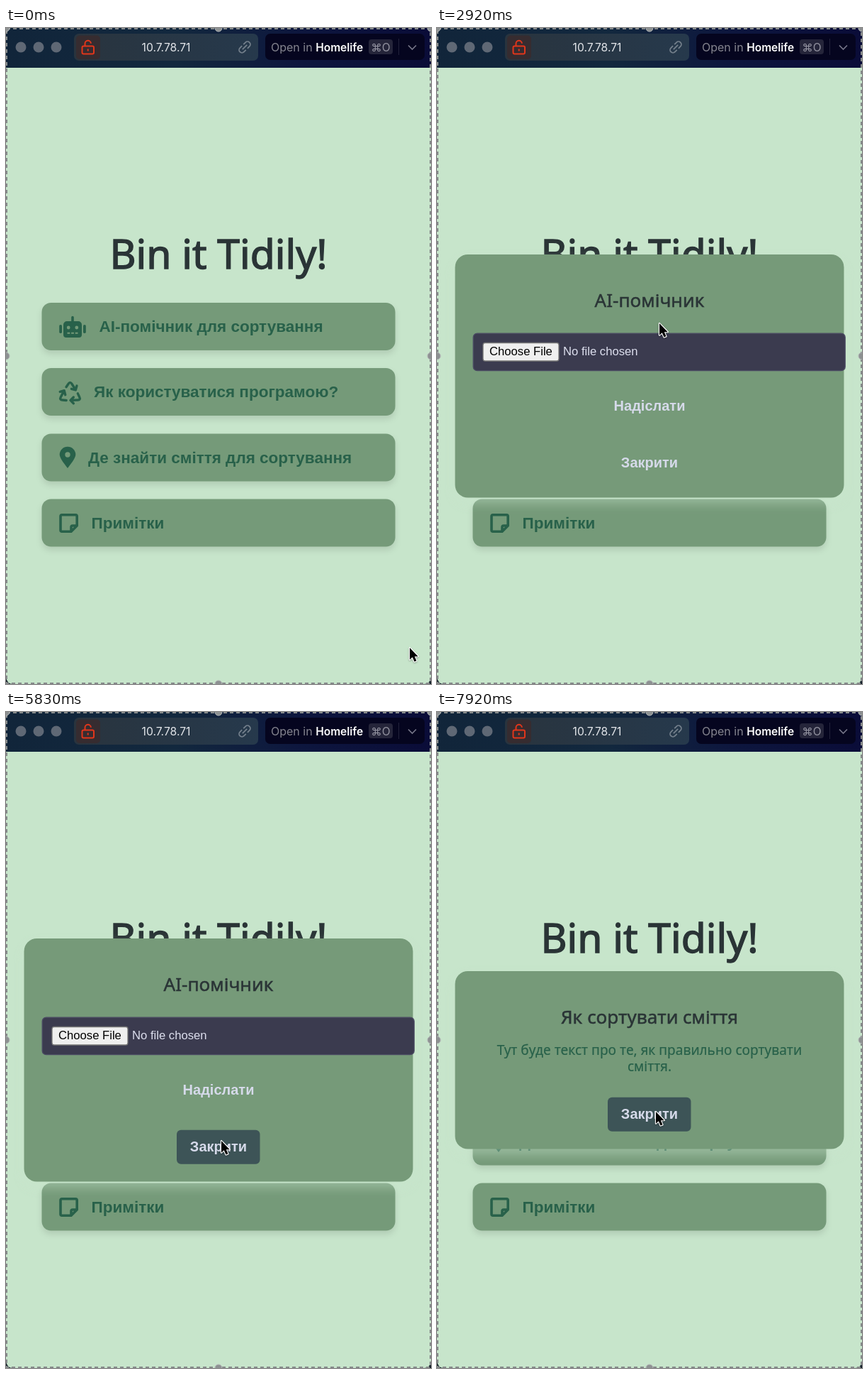
These frames come from a looping animation (600 by 924 pixels, 8 s). An HTML page:

```html
<!DOCTYPE html>
<html lang="uk">
<head>
<meta charset="utf-8">
<title>Bin it Tidily!</title>
<style>
  html, body { margin: 0; width: 100%; height: 100%; overflow: hidden; background: #c7e5cb; }
  svg { display: block; width: 600px; height: 924px; }
  text { white-space: pre; }

  .bar { font: 16px Inter, sans-serif; fill: #e3e6ea; }
  .head { font: 26px "Noto Sans", sans-serif; fill: #2a3436; stroke: #2a3436; stroke-width: .5; text-anchor: middle; }
  .title { font-size: 57px; stroke-width: 1.4; }
  .body { font: 19px "Noto Sans", sans-serif; fill: #28614a; stroke: #28614a; stroke-width: .2; text-anchor: middle; }
  .file { font: 16.67px "Liberation Sans", Arial, sans-serif; }
  .action { font: bold 20px "Liberation Sans", Arial, sans-serif; fill: #d6daea; text-anchor: middle; }

  .item { color: #759a79; }
  .plate { fill: currentColor; filter: drop-shadow(0 5px 4px rgba(0, 0, 0, .11)); }
  .item text { font: bold 22.5px "Liberation Sans", Arial, sans-serif; }
  .ink { fill: #28614a; }
  .line { fill: none; stroke: #28614a; stroke-linecap: round; stroke-linejoin: round; }
  .panel { fill: #769a79; filter: drop-shadow(0 8px 8px rgba(199, 229, 203, .45)); }
  .hover { fill: #3d5457; }

  .item, .modal, .hover, #cursor { animation: 8s linear infinite paused; }
  #ask { transform-origin: 300px 420.5px; animation-name: ask; }
  #how { transform-origin: 300px 512.5px; animation-name: how; }
  #where { transform-origin: 300px 605px; animation-name: where; }
  #helper { animation-name: helper; animation-timing-function: step-end; }
  #guide { animation-name: guide; animation-timing-function: step-end; }
  #send { animation-name: send; }
  #close1 { animation-name: close1; }
  #close2 { animation-name: close2; }
  #cursor { animation-name: cursor; filter: drop-shadow(0 1px 1px rgba(0, 0, 0, .3)); }

  @keyframes ask {
    0%, 22%, 42%, 100% { transform: scale(1); color: #759a79; }
    25.7%, 38% { transform: scale(1.05); color: #d6dfd7; }
  }
  @keyframes how {
    0%, 79%, 93%, 100% { transform: scale(1); color: #759a79; }
    82.6%, 89% { transform: scale(1.05); color: #d6dfd7; }
  }
  @keyframes where {
    0%, 75.5%, 82.5%, 100% { transform: scale(1); color: #759a79; }
    79% { transform: scale(1.05); color: #d6dfd7; }
  }
  @keyframes helper { 0%, 75.5% { opacity: 0; } 33% { opacity: 1; } 100% { opacity: 0; } }
  @keyframes guide { 0% { opacity: 0; } 87%, 100% { opacity: 1; } }
  @keyframes send { 0%, 57.5%, 70.5%, 100% { opacity: 0; } 60.5%, 68% { opacity: 1; } }
  @keyframes close1 { 0%, 69.5%, 100% { opacity: 0; } 72.5%, 76% { opacity: 1; } }
  @keyframes close2 { 0%, 91%, 100% { opacity: 0; } 94%, 99.9% { opacity: 1; } }
  @keyframes cursor {
    0%, 10% { transform: translate(570px, 873px); animation-timing-function: ease-in-out; }
    21.875% { transform: translate(544px, 391px); animation-timing-function: ease-in-out; }
    29% { transform: translate(322px, 423px); animation-timing-function: ease-out; }
    36.4%, 45% { transform: translate(314px, 416px); animation-timing-function: ease-in-out; }
    57.25% { transform: translate(276px, 508px); animation-timing-function: ease-out; }
    61%, 66% { transform: translate(290px, 531px); animation-timing-function: ease-in-out; }
    72%, 76% { transform: translate(304px, 604px); animation-timing-function: ease-out; }
    83.3%, 88% { transform: translate(332.5px, 528px); animation-timing-function: ease-in-out; }
    94%, 100% { transform: translate(309px, 563px); }
  }
</style>
</head>
<body>
<svg viewBox="0 0 600 924">
  <defs>
    <linearGradient id="sky">
      <stop offset="0" stop-color="#11253a"/>
      <stop offset=".4" stop-color="#12283e"/>
      <stop offset=".7" stop-color="#0d163e"/>
      <stop offset="1" stop-color="#0a0c38"/>
    </linearGradient>
    <linearGradient id="field">
      <stop offset="0" stop-color="#29343e"/>
      <stop offset="1" stop-color="#26394c"/>
    </linearGradient>
    <path id="arrow" d="M-5.2 -8.8L-2.3 -13Q0 -16.5 2.3 -13L7.2 -5.2M8.9 -10.4L7.4 -4.8L1.8 -6.3"/>
  </defs>

  <rect width="600" height="924" fill="#c7e5cb"/>

  <!-- browser bar -->
  <rect width="600" height="56" fill="url(#sky)"/>
  <g fill="#5f6875">
    <circle cx="21" cy="27" r="7.5"/><circle cx="46" cy="27" r="7.5"/><circle cx="71" cy="27" r="7.5"/>
  </g>
  <rect x="96" y="8" width="260" height="38" rx="7" fill="url(#field)"/>
  <rect x="99" y="10.5" width="34" height="33.5" rx="5" fill="#362c30"/>
  <g fill="none" stroke="#e2361b" stroke-width="2">
    <rect x="107.5" y="25.5" width="16.5" height="11" rx="2"/>
    <path d="M111.5 25.5V22.3a4.2 4.2 0 0 1 8.4 -.5M115.7 29.5v3"/>
  </g>
  <text class="bar" x="226" y="33" text-anchor="middle" style="font-size:15.7px">10.7.78.71</text>
  <path transform="translate(337 27) rotate(-45)" d="M-1.5 -4H-5.5a4 4 0 0 0 0 8H-1.5M1.5 -4H5.5a4 4 0 0 1 0 8H1.5M-4.5 0H4.5" fill="none" stroke="#74808c" stroke-width="1.8"/>
  <rect x="366" y="8" width="225" height="37" rx="7" fill="#05051f"/>
  <text class="bar" x="374" y="32.5" style="fill:#85858f">Open in <tspan font-weight="600" fill="#fff" style="font-size:15.5px">Homelife</tspan></text>
  <rect x="512" y="16" width="34" height="21" rx="4" fill="#25253a"/>
  <text class="bar" x="529" y="32.5" text-anchor="middle" style="fill:#9393a0;font-size:15.5px">⌘O</text>
  <path d="M554.5 15V38" stroke="#22223a"/>
  <path d="M568 24.5l5.5 5.5l5.5 -5.5" fill="none" stroke="#77778a" stroke-width="1.6"/>

  <!-- menu -->
  <text class="head title" x="300" y="339">Bin it Tidily!</text>

  <g class="item" id="ask">
    <rect class="plate" x="50.5" y="387" width="499" height="67" rx="13"/>
    <path class="ink" fill-rule="evenodd" d="M92.2 413V407.5a1.8 1.8 0 0 1 3.6 0V413H102a5 5 0 0 1 5 5V432a4 4 0 0 1 -4 4H85a4 4 0 0 1 -4 -4V418a5 5 0 0 1 5 -5Z
      M85.8 422a2.4 2.4 0 1 0 4.8 0a2.4 2.4 0 1 0 -4.8 0Z
      M97.4 422a2.4 2.4 0 1 0 4.8 0a2.4 2.4 0 1 0 -4.8 0Z
      M86.5 428.7h3.8v2h-3.8ZM92.1 428.7h3.8v2h-3.8ZM97.7 428.7h3.8v2h-3.8Z"/>
    <rect class="ink" x="75.2" y="418" width="3.8" height="12" rx="1.8"/>
    <rect class="ink" x="109" y="418" width="3.8" height="12" rx="1.8"/>
    <text class="ink" x="131.5" y="428">AI-помічник для сортування</text>
  </g>

  <g class="item" id="how">
    <rect class="plate" x="50.5" y="479" width="499" height="67" rx="13"/>
    <g class="line" stroke-width="3.2" transform="translate(90.5 515) scale(1.06)">
      <use href="#arrow"/><use href="#arrow" transform="rotate(120)"/><use href="#arrow" transform="rotate(240)"/>
    </g>
    <text class="ink" x="124" y="520">Як користуватися програмою?</text>
  </g>

  <g class="item" id="where">
    <rect class="plate" x="50.5" y="571.5" width="499" height="67" rx="13"/>
    <path class="ink" fill-rule="evenodd" d="M87 620C84 616 75.7 606 75.7 601a11.3 11.3 0 0 1 22.6 0C98.3 606 90 616 87 620Z
      M83.3 601a3.7 3.7 0 1 0 7.4 0a3.7 3.7 0 1 0 -7.4 0Z"/>
    <text class="ink" x="116" y="612.5">Де знайти сміття для сортування</text>
  </g>

  <g class="item">
    <rect class="plate" x="50.5" y="663.5" width="499" height="67" rx="13"/>
    <path class="line" stroke-width="3.6" d="M79 685.8H98.2a2 2 0 0 1 2 2V701L92 709.2H79a2 2 0 0 1 -2 -2V687.8a2 2 0 0 1 2 -2ZM92 709V703a2 2 0 0 1 2 -2H100"/>
    <text class="ink" x="120.5" y="705">Примітки</text>
  </g>

  <!-- dialogs -->
  <g class="modal" id="helper">
    <rect class="panel" x="25.5" y="319" width="549" height="342.5" rx="18"/>
    <text class="head" x="300" y="392.5">AI-помічник</text>
    <rect x="51.2" y="430.2" width="525" height="52.5" rx="5.5" fill="#3b3b4f" stroke="#4b4a63" stroke-width="1.3"/>
    <rect x="65" y="443.5" width="107" height="25.5" rx="3" fill="#efefef" stroke="#767676" stroke-width="1.3"/>
    <text class="file" x="74" y="461">Choose File</text>
    <text class="file" x="178" y="461" fill="#dddfee">No file chosen</text>
    <rect class="hover" id="send" x="231" y="508" width="138" height="48" rx="6"/>
    <text class="action" x="300" y="538.5">Надіслати</text>
    <rect class="hover" id="close1" x="241" y="588.7" width="117.5" height="48" rx="6"/>
    <text class="action" x="300" y="619">Закрити</text>
  </g>

  <g class="modal" id="guide">
    <rect class="panel" x="25.5" y="365" width="549" height="250.5" rx="18"/>
    <text class="head" x="300" y="438.5">Як сортувати сміття</text>
    <text class="body" x="300" y="483">Тут буде текст про те, як правильно сортувати</text>
    <text class="body" x="300" y="506">сміття.</text>
    <rect class="hover" id="close2" x="241" y="542.7" width="117.5" height="48" rx="6"/>
    <text class="action" x="300" y="573">Закрити</text>
  </g>

  <!-- selection frame -->
  <path d="M0 914Q1 924 10 924H0ZM600 914Q599 924 590 924H600Z" fill="#15202a"/>
  <rect x="1" y="1" width="598" height="922" fill="none" stroke="#85898a" stroke-width="2" stroke-dasharray="5 4"/>
  <g fill="#8d9192" stroke="#b4b8b8">
    <circle cx="300" cy="0" r="5"/><circle cx="300" cy="924" r="5"/>
    <circle cx="0" cy="462" r="5"/><circle cx="600" cy="462" r="5"/>
    <circle cx="0" cy="0" r="5"/><circle cx="600" cy="0" r="5"/>
  </g>

  <g id="cursor">
    <path transform="scale(.95)" d="M0 0V17.5L4 13.9L6.9 20.6L10 19.3L7.2 12.8H12.4Z" stroke="#fff" stroke-width="2.4" stroke-linejoin="round" paint-order="stroke"/>
  </g>
</svg>
<script>
  // Step every animation at 12 pictures per second; LEAD absorbs rounding to 10 ms.
  const LOOP = 8000, STEP = 1000 / 12, LEAD = 5;
  const parts = document.getAnimations();
  const start = performance.now();

  function draw() {
    const t = (performance.now() - start) % LOOP;
    const time = Math.floor((t + LEAD) / STEP) * STEP % LOOP;
    for (const part of parts) part.currentTime = time;
    requestAnimationFrame(draw);
  }
  draw();
</script>
</body>
</html>
```
